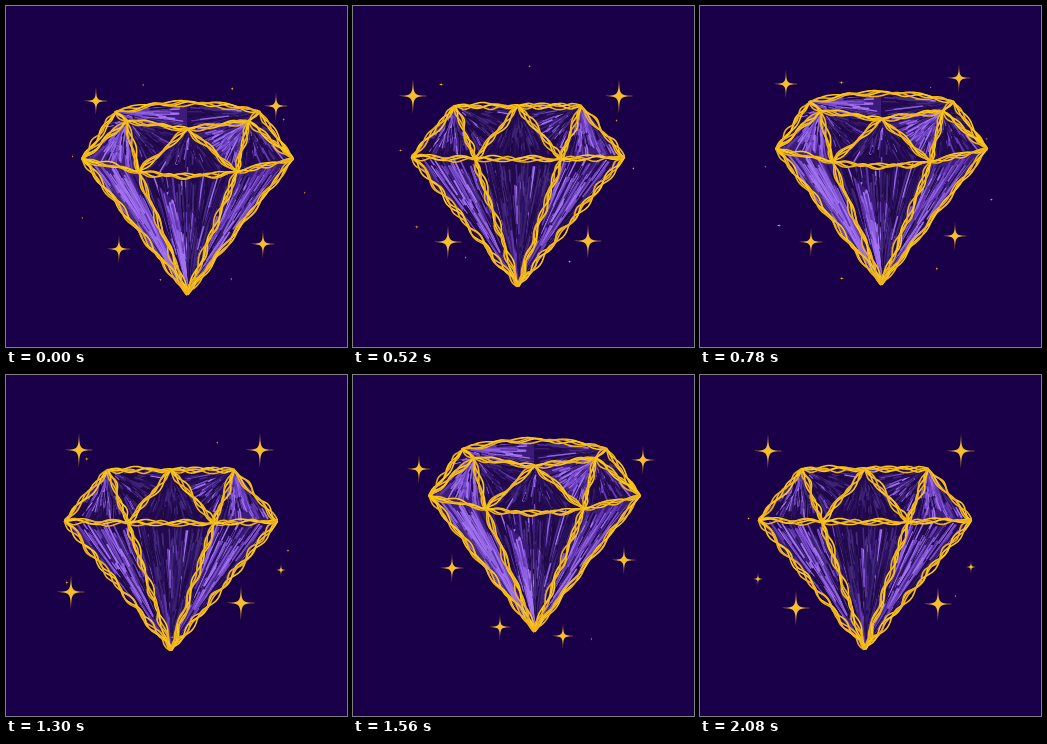
Recreate the animation shown at these times as an HTML page with a canvas. Size 341 px wide and 341 px high, loop 2340 ms.

```html
<!DOCTYPE html>
<html lang="en">
<head>
<meta charset="utf-8">
<title>Diamond</title>
<style>
html, body { margin: 0; width: 100%; height: 100%; overflow: hidden; background: #1a0048; }
canvas { display: block; width: 100%; height: 100%; }
</style>
</head>
<body>
<canvas id="stage"></canvas>
<script>
const SIZE = 341, STEP = 260;
const canvas = document.getElementById('stage');
const ctx = canvas.getContext('2d');
const scale = Math.max(1, window.devicePixelRatio || 1);
canvas.width = canvas.height = SIZE * scale;

const lerp = (a, b, t) => a + (b - a) * t;
const blend = (p, q, t) => p.map((v, i) => lerp(v, q[i], t));
const pick = (list, rnd) => list[Math.floor(rnd() * list.length)];
function random(seed) {
  return () => {
    seed = (seed * 1664525 + 1013904223) >>> 0;
    return seed / 4294967296;
  };
}

// Corners mirrored about an axis: [half width, y] of table, face, girdle and front girdle.
function gem(axis, table, face, girdle, inner, back, mid, tip) {
  const at = { back: [axis, back], mid: [axis, mid], tip: [axis, tip] };
  Object.entries({ t: table, f: face, g: girdle, m: inner }).forEach(([key, [w, y]]) => {
    at[key + 'l'] = [axis - w, y];
    at[key + 'r'] = [axis + w, y];
  });
  return at;
}
const tilted = gem(181.5, [72, 106], [61, 115], [105, 153], [49, 166], 98, 123, 288);
const front = gem(165, [63, 100], [63, 100], [106, 151], [43, 153], 100, 100, 280);

// Base corners, the corner the threads run to, glow in the tilted and the front view.
const facets = [
  ['back mid tl', .7, 0], ['mid fl tl', .6, 0], ['back mid tr', .1, 0], ['mid fr tr', .1, 0],
  ['tl gl fl', .2, 0], ['tr gr fr', .1, 0], ['ml gl fl', .7, .4], ['mid ml fl', .1, .1],
  ['ml mr mid', .1, 0], ['mid mr fr', .7, .3], ['mr gr fr', .2, .7],
  ['gl ml tip', .7, .5], ['ml mr tip', .1, .1], ['mr gr tip', .6, .5]
].map(([names, ...glow]) => ({ names: names.split(' '), glow }));

const rim = ['tl tr', 'tl fl', 'tr fr', 'tl gl', 'tr gr'];
const edges = ['fl mid', 'mid fr', 'fl gl', 'fr gr', 'fl ml', 'mid ml', 'mid mr', 'fr mr',
  'gl ml', 'ml mr', 'mr gr', 'gl tip', 'ml tip', 'mr tip', 'gr tip'];
const bows = { 'tl tr': -9, 'ml mr': 4 };

const lifts = [0, 2, 0, 10, 9, 5, 32, 10, 6];
// Large sparkles; the middle view lies halfway between its neighbours.
const sparks = {
  0: [[90, 95], [270, 100], [113, 243], [257, 238]],
  2: [[60, 90], [266, 90], [95, 236], [235, 235]],
  3: [[86, 78], [259, 72], [111, 236], [255, 230]],
  5: [[73, 75], [254, 75], [65, 217], [235, 228], [275, 195]],
  6: [[66, 94], [290, 85], [99, 193], [271, 185], [147, 252], [210, 261]],
  8: [[68, 76], [261, 76], [96, 233], [238, 229], [58, 204], [271, 192]]
};

const bright = ['#7749cb', '#8f62e0', '#a273ee', '#6236b3'];
const dark = ['#3a1f72', '#210a4a', '#452a80', '#2a1060', '#1e0842'];
const gold = ['#fac814', '#f0b41e', '#fcca18', '#eeb020'];

// Threads fan from the side pq towards r, brightest in the middle.
function fillFacet(p, q, r, glow, rnd) {
  const area = Math.abs((q[0] - p[0]) * (r[1] - p[1]) - (r[0] - p[0]) * (q[1] - p[1])) / 2;
  ctx.save();
  ctx.beginPath();
  [p, q, r].forEach(c => ctx.lineTo(c[0], c[1]));
  ctx.closePath();
  ctx.fillStyle = glow > .55 ? '#3c1b7b' : '#230a50';
  ctx.fill();
  ctx.clip();
  for (let i = 0; i < area / 14 + 12; i++) {
    const u = rnd();
    const base = blend(p, q, u);
    const from = rnd() * .7;
    const a = blend(base, r, from);
    const b = blend(base, r, Math.min(1, from + .12 + rnd() * .28));
    const level = glow * (.45 + .85 * Math.sin(Math.PI * u));
    ctx.beginPath();
    ctx.moveTo(a[0], a[1]);
    ctx.lineTo(b[0] + rnd() * 4 - 2, b[1]);
    ctx.strokeStyle = pick(rnd() < level ? bright : dark, rnd);
    ctx.lineWidth = 1.1 + rnd() * .9;
    ctx.stroke();
  }
  ctx.restore();
}

// A loose bundle of long, wavy golden threads.
function yarn(p, q, bow, amp, rnd) {
  const dx = q[0] - p[0], dy = q[1] - p[1], len = Math.hypot(dx, dy);
  for (let s = 0; s < 4; s++) {
    const side = (s - 1.5) * .9;
    const phase = s * 1.7 + rnd() * 2;
    const wave = 26 + rnd() * 20;
    const size = amp * (.5 + rnd() * .5);
    ctx.beginPath();
    for (let d = 0; d <= len + 1; d += 2) {
      const u = Math.min(1, d / len);
      const ease = Math.min(1, Math.min(u, 1 - u) * len / 14 + .35);
      const off = ease * (side + size * Math.sin(d / wave * 2 * Math.PI + phase));
      ctx.lineTo(p[0] + dx * u - dy / len * off, p[1] + dy * u + dx / len * off + bow * 4 * u * (1 - u));
    }
    ctx.strokeStyle = gold[s];
    ctx.lineWidth = 1.6;
    ctx.stroke();
  }
}

// Four slim spikes drawn by quarter turns.
function sparkle(x, y, r) {
  const c = r * .03;
  ctx.save();
  ctx.translate(x, y);
  ctx.fillStyle = '#f7be2b';
  ctx.beginPath();
  ctx.moveTo(0, -r);
  for (let i = 0; i < 4; i++) {
    ctx.bezierCurveTo(c, -c, c, -c, r, 0);
    ctx.rotate(Math.PI / 2);
  }
  ctx.fill();
  ctx.restore();
}

function drawGem(turn, lift) {
  const rnd = random(71 + turn * 40);
  const at = {};
  for (const key in tilted) at[key] = blend(tilted[key], front[key], turn);
  const flat = turn === 1;
  ctx.save();
  ctx.translate(0, -lift);
  facets.forEach(({ names, glow }) => {
    fillFacet(...names.map(n => at[n]), lerp(...glow, turn), rnd);
  });
  if (!flat) {
    const [x, y] = at.tip;
    fillFacet([x - 29, y - 108], [x - 6, y - 86], [x + 1, y], .9, rnd);
  }
  (flat ? edges : rim.concat(edges)).forEach(edge => {
    const [p, q] = edge.split(' ');
    yarn(at[p], at[q], (bows[edge] || 0) * (1 - turn), lerp(2.3, 2.8, turn), rnd);
  });
  ctx.restore();
}

function sparksAt(i) {
  if (sparks[i]) return sparks[i];
  return sparks[i - 1].slice(0, 4).map((p, n) => blend(p, sparks[i + 1][n], .5));
}

// Tiny sparkles ring the gem, fewer where large ones are many.
function drawSparks(i, turn) {
  const list = sparksAt(i);
  list.forEach(([x, y], n) => sparkle(x, y, n < 4 ? lerp(14.5, 17.5, turn) : lerp(13, 7, turn)));
  const rnd = random(i * 997 + 5);
  const count = 20 - 3 * list.length;
  for (let n = 0; n < count; n++) {
    const angle = (n + rnd() * .6) / count * 2 * Math.PI;
    const reach = 1 + rnd() * .08;
    sparkle(lerp(181, 163, turn) + Math.cos(angle) * 112 * reach,
      lerp(175, 162, turn) + Math.sin(angle) * 100 * reach, 1.8 + rnd() * 1.2);
  }
}

function draw(i) {
  const turn = i % 3 / 2;
  ctx.setTransform(scale, 0, 0, scale, 0, 0);
  ctx.lineCap = ctx.lineJoin = 'round';
  ctx.fillStyle = '#1a0048';
  ctx.fillRect(0, 0, SIZE, SIZE);
  drawGem(turn, lifts[i]);
  drawSparks(i, turn);
}

let shown = -1;
const start = performance.now();
function tick(now) {
  const i = Math.floor(Math.max(0, now - start) / STEP) % lifts.length;
  if (i !== shown) draw(shown = i);
  requestAnimationFrame(tick);
}
tick(start);
</script>
</body>
</html>
```
